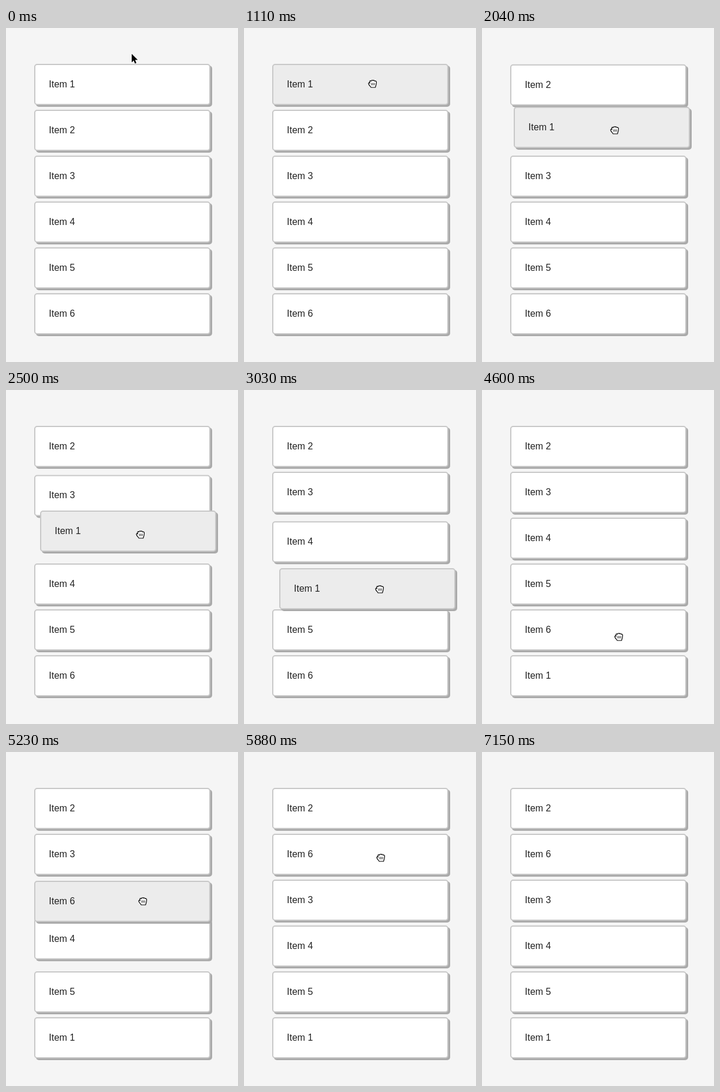
An HTML page that plays this animation: 395x568 px, repeating every 7920 ms.

```html
<!DOCTYPE html>
<html lang="en">
<head>
<meta charset="utf-8">
<title>Reorder list</title>
<style>
  html, body { margin: 0; width: 100%; height: 100%; overflow: hidden; background: #f5f5f5; }
  body { position: relative; }
  .item {
    position: absolute; left: 0; top: 0; width: 300px; height: 70px;
    box-sizing: border-box; padding-left: 23px;
    border: 2px solid #c8c8c8; border-radius: 5px;
    background: #fff; box-shadow: 3px 3px 0 #aaa;
    font: 16px/66px "Liberation Sans", Arial, sans-serif; color: #222;
  }
  .item.held { background: #ececec; z-index: 1; }
  svg { position: absolute; left: 0; top: 0; width: 1px; height: 1px; overflow: visible; z-index: 2; }
</style>
</head>
<body>
<svg>
  <path id="arrow" d="M0 0V14.5L3.4 11.3 5.6 16.4 8 15.4 5.8 10.3H10.3Z"
    stroke="#fff" stroke-width="1.8" paint-order="stroke"/>
  <g id="hand" fill="#fff" stroke="#000" stroke-width="1.2" stroke-linejoin="round" stroke-linecap="round">
    <path d="M-2.8 6C-3.6 4-6.8 2.2-7-.6C-7-2-5.4-2.2-4.6-1.2L-5.2-3.6C-5.2-5.2-3.4-5.6-2.6-4.4
      C-2.4-6.6 0-6.8.6-5.2C1.4-6.6 3.4-6.2 3.6-4.6C4.8-5.4 6.5-4.6 6.5-3C6.5.8 5.8 2.6 4.6 6Z"/>
    <path d="M-1.7-1.2V2M.7-1.2V2M3.1-1.2V2" stroke-width=".9"/>
  </g>
</svg>
<script>
const LOOP = 7920, LEFT = 48, TOP = 61, PITCH = 78, WIDTH = 300, HEIGHT = 70;
const LAG = 44;      // a held item trails the pointer
const SHIFT = 265;   // time for a neighbour to change slot
const REACH = 43;    // travel that swaps two items

// Pointer stops: time, x, y
const stops = [
  [570, 214, 44], [880, 219, 95], [1480, 219, 95], [2040, 226, 174],
  [2276, 228, 213], [2834, 231, 294], [2986, 231, 337], [3096, 231, 343],
  [3916, 233, 495], [3990, 233, 497], [4240, 233, 497], [4600, 233, 420],
  [5190, 233, 262], [5600, 233, 180], [6260, 233, 180],
  [7000, 375, 525], [7090, 371, 563], [7150, 371, 600]
];

const drags = [{ item: 0, from: 1110, to: 4080 }, { item: 5, from: 4655, to: 5880 }];

function pointer(t) {
  const next = stops.findIndex(s => s[0] > t);
  if (next < 1) return stops.at(next).slice(1);
  const a = stops[next - 1], b = stops[next], u = (t - a[0]) / (b[0] - a[0]);
  return [1, 2].map(c => Math.round(a[c] + (b[c] - a[c]) * u));
}

const slotTop = slot => TOP + PITCH * slot;

// Follow each drag once to learn when its neighbours make room
function findShifts() {
  const shifts = [], order = [0, 1, 2, 3, 4, 5];
  for (const drag of drags) {
    let slot = order.indexOf(drag.item);
    const [x, y] = pointer(drag.from - LAG);
    drag.grab = [x - LEFT, y - slotTop(slot)];
    for (let t = drag.from; t < drag.to; t++) {
      const travel = pointer(t - LAG)[1] - drag.grab[1] - slotTop(slot);
      if (Math.abs(travel) <= REACH) continue;
      const next = slot + Math.sign(travel), item = order[next];
      shifts.push({ time: t, item, slot });
      order[slot] = item;
      order[next] = drag.item;
      slot = next;
    }
    drag.slot = slot;
  }
  return shifts;
}

const shifts = findShifts();

function place(item, t) {
  const drag = drags.find(d => d.item === item);
  if (drag && t >= drag.from && t < drag.to) {
    const [x, y] = pointer(t - LAG);
    return [x - drag.grab[0], y - drag.grab[1], true];
  }
  let slot = item;
  for (const s of shifts) {
    if (s.item !== item || t < s.time) continue;
    const rest = 1 - Math.min(1, (t - s.time) / SHIFT);
    slot = s.slot + (slot - s.slot) * rest ** 3;
  }
  if (drag && t >= drag.to) slot = drag.slot;
  return [LEFT, slotTop(slot), false];
}

function overItem(x, y) {
  const dy = y - TOP;
  return x >= LEFT && x < LEFT + WIDTH && dy >= 0 && dy < PITCH * 6 && dy % PITCH < HEIGHT;
}

const items = Array.from({ length: 6 }, (_, i) => {
  const el = document.createElement("div");
  el.className = "item";
  el.textContent = `Item ${i + 1}`;
  document.body.append(el);
  return el;
});

function showCursor(id, visible, x, y) {
  const el = document.getElementById(id);
  el.setAttribute("transform", `translate(${x} ${y})`);
  el.style.display = visible ? "" : "none";
}

function draw() {
  const t = performance.now() % LOOP;
  let holding = false;
  items.forEach((el, i) => {
    const [x, y, held] = place(i, t);
    el.style.transform = `translate(${x}px, ${y}px)`;
    el.classList.toggle("held", held);
    holding ||= held;
  });
  const [x, y] = pointer(t), grabbing = holding || overItem(x, y);
  showCursor("hand", grabbing, x, y);
  showCursor("arrow", !grabbing, x, y);
  requestAnimationFrame(draw);
}
draw();
</script>
</body>
</html>
```
